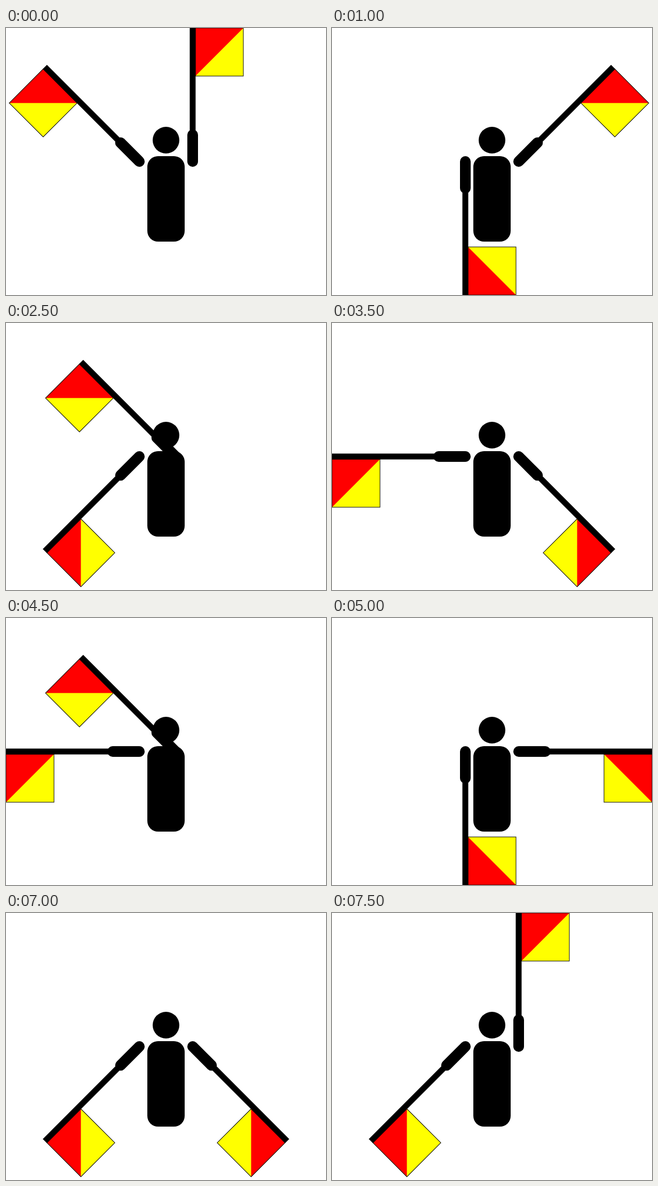
These frames come from a looping animation (600x500 px, 8000 ms). An HTML page:

```html
<!DOCTYPE html>
<html lang="en">
<head>
<meta charset="utf-8">
<style>
  html, body { margin: 0; width: 100%; height: 100%; overflow: hidden; background: #fff; }
  svg { display: block; }
</style>
</head>
<body>
<svg width="600" height="500" viewBox="0 0 600 500">
  <defs>
    <!-- shoulder at the origin, flag pointing up -->
    <g id="arm">
      <rect x="5" y="-250" width="90" height="90" fill="#ff0"/>
      <path d="M5-250H95L5-160Z" fill="red"/>
      <rect x="5" y="-250" width="90" height="90" fill="none" stroke="#000"/>
      <rect x="-5" y="-250" width="10" height="200" stroke="#000"/>
      <rect x="-10" y="-60" width="20" height="70" rx="10"/>
    </g>
  </defs>
  <circle cx="300" cy="210" r="25"/>
  <rect x="265" y="240" width="70" height="160" rx="20"/>
  <use id="left" href="#arm"/>
  <use id="right" href="#arm"/>
</svg>
<script>
  // Degrees away from straight up, [left, right]; a negative right arm reaches across the body.
  const POSES = {
    T: [45, 0], H: [90, -135], E: [180, 45], S: [90, 135], I: [135, -45], N: [135, 135],
    O: [90, -45], F: [180, 90], M: [135, 90], A: [135, 180], K: [135, 0], ' ': [180, 180]
  };
  const MESSAGE = 'THE SINS OF MANK';
  const STEP = 500;
  const SHIFT = 32;
  const left = document.getElementById('left');
  const right = document.getElementById('right');

  function place(arm, x, side, angle) {
    arm.setAttribute('transform', `translate(${x} 250) scale(${side} 1) rotate(${angle})`);
  }

  function pose(letter) {
    const [l, r] = POSES[letter];
    const spread = letter === ' ' ? SHIFT : 0;
    const across = r < 0;
    place(left, 250 - spread, -1, l);
    place(right, across ? 350 - SHIFT : 350 + spread, across ? -1 : 1, Math.abs(r));
  }

  function draw() {
    pose(MESSAGE[Math.floor(performance.now() / STEP) % MESSAGE.length]);
    requestAnimationFrame(draw);
  }
  draw();
</script>
</body>
</html>
```
